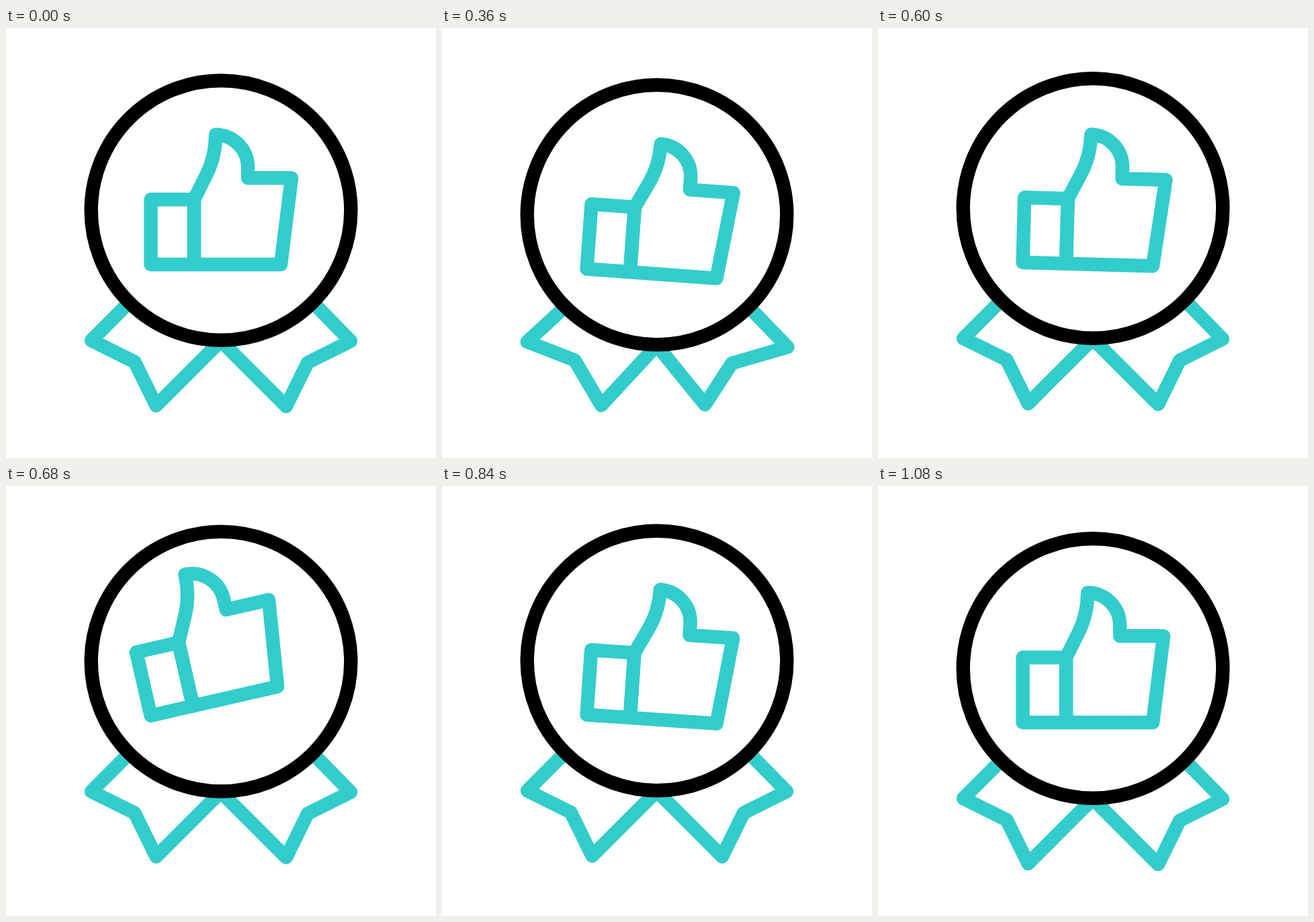
Recreate the animation shown at these times as an HTML page. Size 640 by 640 pixels, loop 1480 ms.

```html
<!DOCTYPE html>
<html lang="en">
<head>
<meta charset="utf-8">
<title>Award badge</title>
<style>
  html, body { margin: 0; width: 100%; height: 100%; overflow: hidden; background: #fff; }
  svg { display: block; width: 100%; height: 100%; }
  path, circle { stroke-width: 20.4; stroke-linecap: round; stroke-linejoin: round; }
  path { fill: none; stroke: #33cccc; }
  circle { fill: #fff; stroke: #000; }
</style>
</head>
<body>
<svg viewBox="0 0 640 640">
  <g id="badge">
    <path id="left"/>
    <path id="right"/>
    <circle cx="320" cy="271.5" r="193.3"/>
    <g id="thumb">
      <path d="M215.5 255.3H280V352H215.5Z"/>
      <path d="M280 352H409L425 223.3H360V207A48.3 48.3 0 0 0 312 158.7C312 179 307.5 200 298.5 218L280 255.3Z"/>
    </g>
  </g>
</svg>
<script>
const LOOP = 1480, STEP = 40;
const byId = id => document.getElementById(id);
const badge = byId('badge'), thumb = byId('thumb');

// Keys are [time, value] pairs, eased in and out between neighbours.
const bobKeys = [[80, 0], [440, 7.5], [760, -13.6], [1080, 0]];
const tiltKeys = [[280, 0], [520, 16], [680, -12.9], [840, 3.9], [1000, 0]];
const squeezeKeys = [[80, 0], [280, 1], [440, 0]];
const flareKeys = [[280, 0], [440, 1], [520, 0]];

// Each ribbon has pinned ends and three free corners with two offset poses.
const ribbons = [
  {
    el: byId('left'), start: [183.3, 408.5], end: [319.5, 466],
    rest: [[127, 465], [191.5, 497], [223.5, 562]],
    squeeze: [[10.8, -14.3], [20.8, -23], [34.7, -23]],
    flare: [[-11.3, 5.2], [-8.8, 5], [-7.7, 9]]
  },
  {
    el: byId('right'), start: [456.7, 408.5], end: [320, 466],
    rest: [[513, 466], [449, 498], [417, 563]],
    squeeze: [[-14.5, -12.3], [-31, -21.6], [-38, -26]],
    flare: [[17.3, 17], [-4, 10.4], [-13, 8]]
  }
];

function sample(keys, t) {
  if (t <= keys[0][0]) return keys[0][1];
  for (let i = 1; i < keys.length; i++) {
    const [t0, a] = keys[i - 1], [t1, b] = keys[i];
    if (t < t1) {
      const p = (t - t0) / (t1 - t0);
      return a + (b - a) * p * p * (3 - 2 * p);
    }
  }
  return keys[keys.length - 1][1];
}

function drawRibbon({ el, start, end, rest, squeeze, flare }, s, f) {
  const corners = rest.map((point, i) =>
    point.map((v, axis) => v + s * squeeze[i][axis] + f * flare[i][axis]));
  el.setAttribute('d', 'M' + [start, ...corners, end].join('L'));
}

function render(t) {
  badge.setAttribute('transform', `translate(0 ${sample(bobKeys, t)})`);
  thumb.setAttribute('transform', `rotate(${sample(tiltKeys, t)} 215.5 352)`);
  const s = sample(squeezeKeys, t), f = sample(flareKeys, t);
  ribbons.forEach(ribbon => drawRibbon(ribbon, s, f));
}

function tick() {
  const t = performance.now() % LOOP;
  render(Math.floor(t / STEP) * STEP);
  requestAnimationFrame(tick);
}
tick();
</script>
</body>
</html>
```
